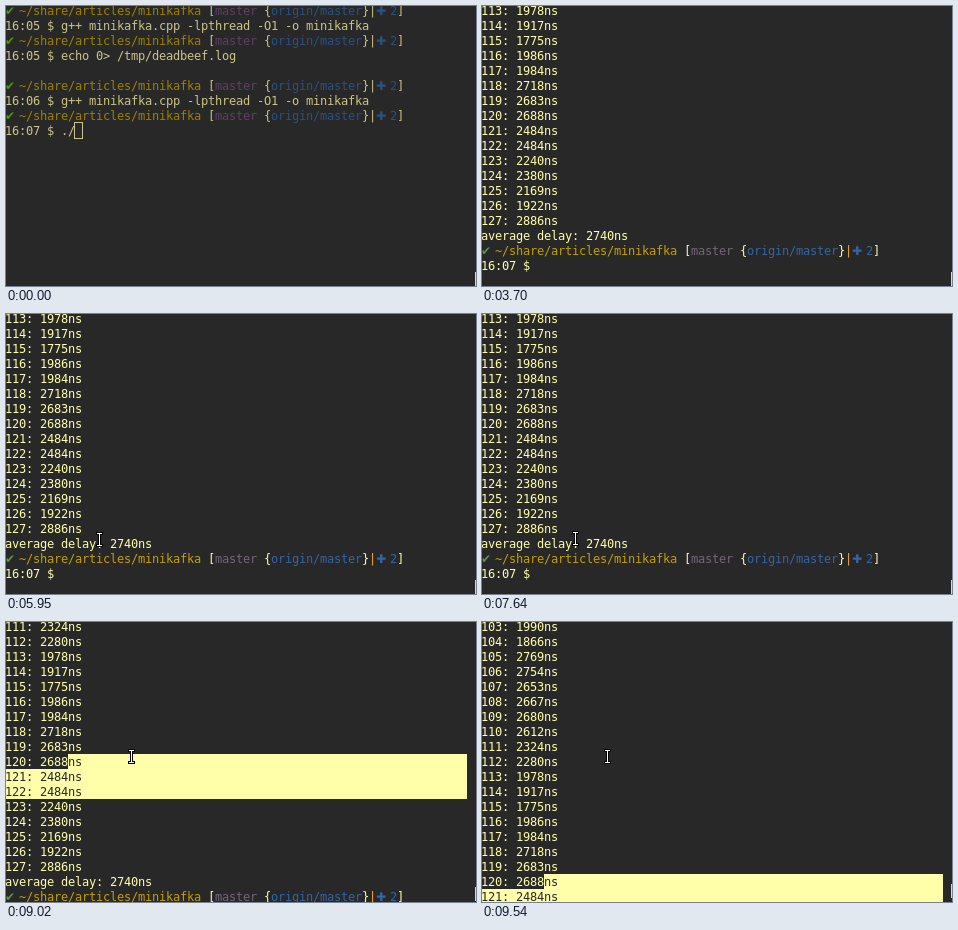
Write an HTML page that moves like this. It is 470x280 px and loops after 9.63 s.

```html
<!DOCTYPE html>
<html lang="en">
<head>
<meta charset="utf-8">
<title>Terminal session</title>
<style>
  html, body { margin: 0; width: 100%; height: 100%; overflow: hidden; background: #282828; }
  svg { display: block; }
  text { font: 12px "DejaVu Sans Mono", monospace; white-space: pre; }
  text.sym { font-family: "DejaVu Sans", sans-serif; }
</style>
</head>
<body>
<svg width="470" height="280" viewBox="0 0 470 280">
  <rect width="470" height="280" fill="#282828"/>
  <g id="screen"></g>
  <rect id="thumb" x="469" width="1" height="14" fill="#d6d6d2"/>
  <g id="mouse" fill="none" stroke-linecap="square">
    <path stroke="#000" stroke-width="3" d="M-1.5-5.5H2.5M.5-5.5V6.5M-1.5 6.5H2.5"/>
    <path stroke="#fff" d="M-1.5-5.5H2.5M.5-5.5V6.5M-1.5 6.5H2.5"/>
  </g>
</svg>
<script>
const LOOP = 9630, CW = 7, RH = 15, LEFT = -1, TOP = -3, COLS = 66;
const BG = '#282828';
const BRIGHT = { fg: '#ffffaa', ok: '#58994a', path: '#c4a000', branch: '#75657a',
                 remote: '#3465a4', bar: '#f5a83c' };
const DIM = { fg: '#ccc488', ok: '#4e9a06', path: '#9d8000', branch: '#5e4062',
              remote: '#2a5183', bar: '#ccc488' };

// A line is a list of [column, text, colour name, symbol?]
const plain = s => [[0, s, 'fg']];
const PROMPT = [
  [0, '✔', 'ok', true], [2, '~/share/articles/minikafka', 'path'], [29, '[', 'fg'],
  [30, 'master', 'branch'], [37, '{', 'fg'], [38, 'origin/master', 'remote'], [51, '}', 'fg'],
  [52, '|', 'bar'], [53, '✚', 'remote', true], [55, '2', 'remote'], [56, ']', 'fg']
];
const BUILD = 'g++ minikafka.cpp -lpthread -O1 -o minikafka';
const SHELL = [
  PROMPT, plain('16:05 $ ' + BUILD),
  PROMPT, plain('16:05 $ echo 0> /tmp/deadbeef.log'), [],
  PROMPT, plain('16:06 $ ' + BUILD), PROMPT
];
const FIRST = 103;
const DELAYS = [1990, 1866, 2769, 2754, 2653, 2667, 2680, 2612, 2324, 2280, 1978, 1917, 1775,
  1986, 1984, 2718, 2683, 2688, 2484, 2484, 2240, 2380, 2169, 1922, 2886];
const OUTPUT = DELAYS.map((d, i) => plain(`${FIRST + i}: ${d}ns`))
  .concat([plain('average delay: 2740ns')]);
const DONE = OUTPUT.concat([PROMPT, plain('16:07 $ ')]);

const BLINKS = [1700, 2310, 3700, 4300, 4900, 5500, 5950, 6550, 7140, 7740, 8280, 8850];
const SCROLLS = [9020, 9070, 9230, 9490, 9540];
const SELECTS = [8500, 8550, 8600];

// Pointer trips: start, end, steps, way points
const TRIPS = [
  [870, 1010, 4, [[467, 61], [360, 98], [280, 150], [254, 165]]],
  [4640, 5530, 22, [[254, 165], [216, 133], [150, 160], [104, 208], [73, 229], [46, 229], [31, 226]]],
  [5640, 5950, 7, [[35, 226], [62, 226], [85, 225], [93, 225]]],
  [7640, 8280, 14, [[93, 224], [88, 190], [76, 140], [64, 112], [62, 109]]],
  [8500, 8600, 3, [[82, 113], [106, 124], [125, 134]]]
];

const screen = document.getElementById('screen');
const mouse = document.getElementById('mouse');
const thumb = document.getElementById('thumb');
const passed = (times, t) => times.filter(x => t >= x).length;
const colX = c => LEFT + c * CW;
const rowY = r => TOP + r * RH;

function add(tag, attrs, text) {
  const el = document.createElementNS('http://www.w3.org/2000/svg', tag);
  for (const k in attrs) el.setAttribute(k, attrs[k]);
  if (text) el.textContent = text;
  screen.appendChild(el);
}

function put(row, col, text, fill, sym) {
  const x = [...text].map((_, i) => colX(col + i)).join(' ');
  add('text', { x, y: rowY(row) + 12, fill, class: sym ? 'sym' : '' }, text);
}

function fillCells(row, from, to, fill) {
  const x = from ? colX(from) : 0;
  add('rect', { x, y: rowY(row), width: colX(to) - x, height: RH, fill });
}

function curve(pts, u) {
  const s = u * (pts.length - 1), i = Math.min(Math.floor(s), pts.length - 2), f = s - i;
  const at = k => pts[Math.max(0, Math.min(pts.length - 1, k))];
  const [a, b, c, d] = [at(i - 1), at(i), at(i + 1), at(i + 2)];
  return [0, 1].map(k => Math.round(b[k] + f / 2 * (c[k] - a[k] +
    f * (2 * a[k] - 5 * b[k] + 4 * c[k] - d[k] + f * (3 * (b[k] - c[k]) + d[k] - a[k])))));
}

function pointer(t) {
  const trip = TRIPS.filter(p => t >= p[0]).pop();
  if (!trip || (t >= 2570 && t < 4640)) return null;
  const [a, b, n, pts] = trip;
  const step = Math.min(n - 1, Math.floor((t - a) * (n - 1) / (b - a)));
  return curve(pts, step / (n - 1));
}

function view(t) {
  const v = {
    focus: t >= 1160, solid: t >= 1200,
    on: passed(BLINKS, t) % 2 === 0,
    typed: t >= 2530, phase: t < 3170 ? 0 : t < 3260 ? 1 : 2,
    scroll: 2 * passed(SCROLLS, t), picked: passed(SELECTS, t)
  };
  return v;
}

function paint(v) {
  screen.textContent = '';
  const pal = v.focus ? BRIGHT : DIM;
  let lines, shift = 0, curRow, curCol, under = '';
  if (v.phase === 0) {
    lines = SHELL.concat([plain('16:07 $ ./' + (v.typed ? 'minikafka' : ''))]);
    curRow = 8; curCol = 10;
    if (v.typed) under = 'm';
  } else {
    lines = v.phase === 1 ? OUTPUT : DONE;
    shift = v.phase === 1 ? -9 : v.scroll - 10;
    curRow = 17 + v.scroll;
    curCol = v.phase === 1 ? 0 : 8;
  }
  lines.forEach((line, i) => {
    const row = i + shift;
    if (row < 0 || row > 18) return;
    for (const [col, text, name, sym] of line) put(row, col, text, pal[name], sym);
  });

  // Selection runs from column 9 of its first line to the right edge
  for (let k = 0; k < v.picked; k++) {
    const i = 120 - FIRST + k, row = i + shift, from = k ? 0 : 9;
    fillCells(row, from, COLS, pal.fg);
    put(row, from, lines[i][0][1].slice(from), BG);
  }

  if (!v.solid) {
    add('rect', { x: colX(curCol) - .5, y: rowY(curRow) - .5, width: CW + 1, height: RH + 1,
                  fill: 'none', stroke: pal.fg });
  } else if (v.on && curRow < 19) {
    add('rect', { x: colX(curCol), y: rowY(curRow), width: CW, height: RH, fill: pal.fg });
    if (under) put(curRow, curCol, under, BG);
  }
  thumb.setAttribute('y', 266 - Math.round(v.scroll * .4));
}

let last = '';
function draw(t) {
  const v = view(t), key = JSON.stringify(v);
  if (key !== last) { paint(v); last = key; }
  const p = pointer(t);
  mouse.style.display = p ? '' : 'none';
  if (p) mouse.setAttribute('transform', `translate(${p})`);
}

const start = performance.now();
function tick() {
  draw((performance.now() - start) % LOOP);
  requestAnimationFrame(tick);
}
tick();
</script>
</body>
</html>
```
